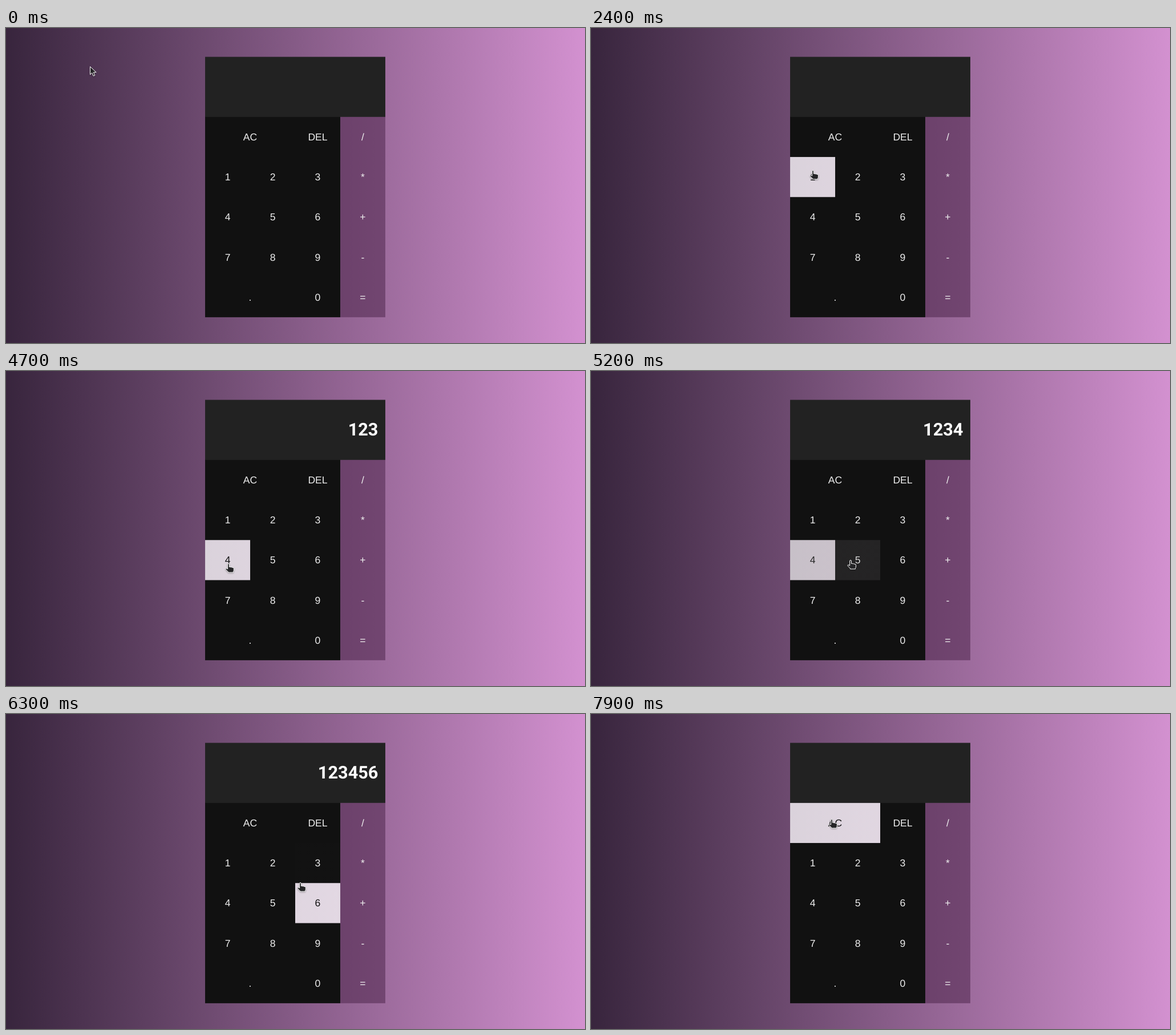
These frames come from a looping animation (1015 by 552 pixels, 8 s). An HTML page:

```html
<!DOCTYPE html>
<html lang="en">
<head>
<meta charset="utf-8">
<title>Calculator</title>
<style>
  html, body { margin: 0; width: 100%; height: 100%; overflow: hidden; }
  body { background: linear-gradient(to right, rgb(56,37,61), rgb(211,145,208)); }
  #stage { display: block; width: 1015px; height: 552px; }
  text { text-rendering: geometricPrecision; }
  .label { font: 17.55px "Liberation Sans", Arial, sans-serif; text-anchor: middle; fill: #eee; }
  #value { font: 700 30.71px Roboto, sans-serif; text-anchor: end; fill: #fff; }
  #pointer { filter: drop-shadow(0 1px 1px rgba(0,0,0,.35)); }
  #pointer path { fill: #252527; stroke: #fff; stroke-linejoin: round; }
</style>
</head>
<body>
<svg id="stage" viewBox="0 0 1015 552">
  <defs>
    <!-- 75% white over the page gradient -->
    <linearGradient id="lit" gradientUnits="userSpaceOnUse" x1="0" x2="1015">
      <stop offset="0" stop-color="rgb(205,201,207)"/>
      <stop offset="1" stop-color="rgb(244,228,243)"/>
    </linearGradient>
  </defs>
  <g id="panel"></g>
  <text id="value"></text>
  <g id="pointer">
    <path id="arrow" d="M.5 .7V14.6L3.8 11.6L6.2 17.1L8.8 16L6.4 10.7H11.2Z"/>
    <path id="hand" d="M-1.4 10V1.9Q-1.4 .5 0 .5T1.4 1.9V6.4Q3.2 5.6 4.3 6.9Q6 6.2 7 7.4Q9.4 7 9.4 9.2V12Q9.4 13.6 8.4 14.6V16H-.6V15L-4.9 10.6Q-5.5 9.2-4.2 8.8Q-3.2 8.6-1.4 10Z"/>
  </g>
</svg>
<script>
const LOOP = 8000, STEP = 100, FADE = 200;
const HOLD = [2400, 4400]; // the picture freezes here while time runs on

// Layout: 90 x 80 keys below a 120 high screen, all at one scale
const SCALE = .8775, LEFT = 349.05, TOP = 50.55;
const COL = 90 * SCALE, ROW = 80 * SCALE, SCREEN = 120 * SCALE;
const KEYS = TOP + SCREEN;

// A repeated label makes one wide key
const grid = [
  ['AC', 'AC', 'DEL', '/'],
  ['1', '2', '3', '*'],
  ['4', '5', '6', '+'],
  ['7', '8', '9', '-'],
  ['.', '.', '0', '=']
];

const home = [147, 67];

// Pointer glides: start, duration, end x, end y
const glides = [
  [1400, 1000, 389, 249], [2700, 300, 467, 255], [3400, 300, 560, 276],
  [4273, 200, 391, 340], [4500, 600, 388, 327], [5136, 90, 472, 332],
  [5602, 105, 552, 334], [5707, 400, 548, 325], [6200, 250, 458, 240],
  [6535, 80, 416, 186], [6615, 185, 421, 184], [7850, 50, 422, 184]
];

const clicks = [
  [2600, '1'], [3200, '2'], [3900, '3'], [4900, '4'], [5500, '5'], [6100, '6'], [7600, 'AC']
];

const $ = id => document.getElementById(id);
const mix = (a, b, k) => a + (b - a) * k;
const clamp = x => Math.min(1, Math.max(0, x));
const smooth = x => (x = clamp(x), x * x * (3 - 2 * x));

function add(tag, attrs) {
  const el = document.createElementNS('http://www.w3.org/2000/svg', tag);
  for (const name in attrs) el.setAttribute(name, attrs[name]);
  return $('panel').appendChild(el);
}

const box = (x, y, width, height, fill) => add('rect', { x, y, width, height, fill });

box(LEFT, KEYS - 1, 3 * COL, 5 * ROW + 1, '#111');
box(LEFT + 3 * COL, KEYS, COL, 5 * ROW, 'rgba(72,32,71,.5)');
box(LEFT, TOP, 4 * COL, SCREEN, '#222');
$('value').setAttribute('x', LEFT + 345.8 * SCALE);
$('value').setAttribute('y', TOP + 71.7 * SCALE);

const keys = {};
grid.forEach((row, r) => new Set(row).forEach(label => {
  const x = LEFT + row.indexOf(label) * COL, y = KEYS + r * ROW;
  const width = row.filter(other => other === label).length * COL;
  const light = box(x, y, width, ROW, 'url(#lit)');
  const text = add('text', { class: 'label', x: x + width / 2, y: y + 47 * SCALE });
  text.textContent = label;
  keys[label] = { light, text, visits: [] };
}));

// The CSS "ease" curve, cubic-bezier(.25, .1, .25, 1), solved by bisection
function ease(x) {
  x = clamp(x);
  let lo = 0, hi = 1;
  for (let i = 0; i < 20; i++) {
    const s = (lo + hi) / 2;
    if (.75 * s - .75 * s * s + s ** 3 < x) lo = s; else hi = s;
  }
  return .3 * hi * (1 - hi) ** 2 + 3 * hi * hi * (1 - hi) + hi ** 3;
}

function pointerAt(t) {
  let [x, y] = home;
  for (const [start, time, endX, endY] of glides) {
    const k = smooth((t - start) / time);
    x = mix(x, endX, k);
    y = mix(y, endY, k);
  }
  return [x, y];
}

function keyAt([x, y]) {
  const row = grid[Math.floor((y - KEYS) / ROW)];
  return row && row[Math.floor((x - LEFT) / COL)];
}

// Follow the pointer once to learn when it enters and leaves each key
let last;
for (let t = 0; t < LOOP; t += 2) {
  const label = keyAt(pointerAt(t));
  if (label === last) continue;
  if (last) keys[last].visits.at(-1).leave = t;
  if (label) keys[label].visits.push({ enter: t, leave: Infinity });
  last = label;
}

function glow(visits, t) {
  return Math.max(0, ...visits.map(({ enter, leave }) =>
    ease((t - enter) / FADE) * (1 - ease((t - leave) / FADE))));
}

function valueAt(t) {
  return clicks.filter(([time]) => time <= t)
    .reduce((shown, [, label]) => label === 'AC' ? '' : shown + label, '');
}

function draw(t) {
  for (const { light, text, visits } of Object.values(keys)) {
    const k = glow(visits, t), ink = mix(238, 17, k);
    light.style.opacity = k;
    text.style.fill = `rgb(${ink},${ink},${ink})`;
  }
  $('value').textContent = valueAt(t);
  const pos = pointerAt(t), overKey = Boolean(keyAt(pos));
  $('pointer').setAttribute('transform', `translate(${pos.map(Math.round)})`);
  $('hand').style.display = overKey ? '' : 'none';
  $('arrow').style.display = overKey ? 'none' : '';
}

const start = performance.now();
function tick() {
  const now = (performance.now() - start + 1) % LOOP;
  const t = Math.floor(now / STEP) * STEP;
  draw(t >= HOLD[0] && t < HOLD[1] ? HOLD[0] : t);
  requestAnimationFrame(tick);
}
tick();
</script>
</body>
</html>
```
